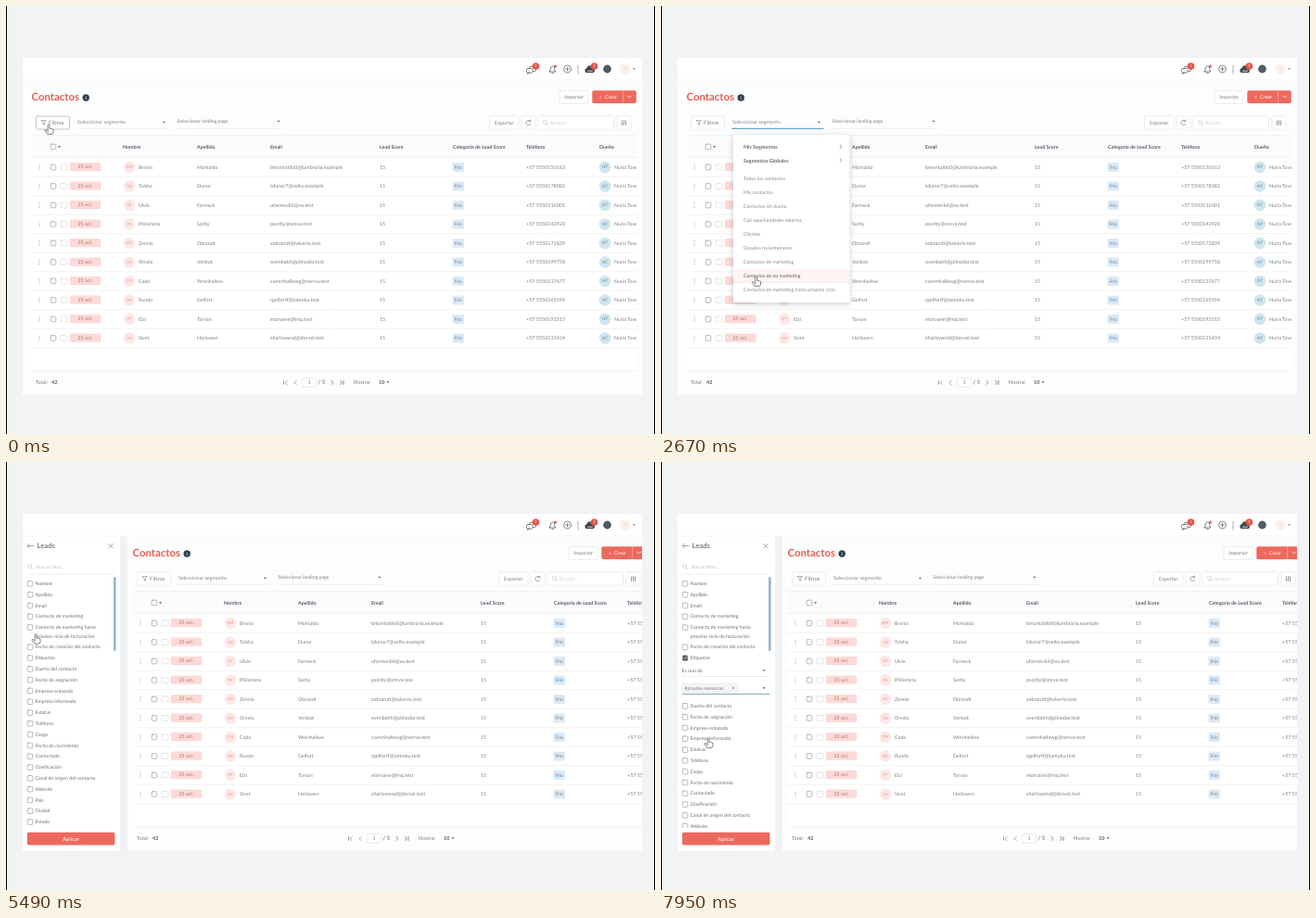
These frames come from a looping animation (700x462 px, 8000 ms). An HTML page with a canvas:

```html
<!DOCTYPE html>
<html lang="es">
<head>
<meta charset="utf-8">
<title>Contactos</title>
<style>
html, body { margin: 0; width: 100%; height: 100%; overflow: hidden; background: #f1f3f5; }
canvas { display: block; width: 700px; height: 462px; }
</style>
</head>
<body>
<canvas id="stage"></canvas>
<script>
const LOOP = 8000;
const RED = '#ee695d', TEXT = '#7a7e84', DARK = '#565b62', PALE = '#bcc0c6', EDGE = '#e2e5e8', BLUE = '#6fa5c6';

const canvas = document.getElementById('stage');
const ratio = window.devicePixelRatio || 1;
canvas.width = 700 * ratio;
canvas.height = 462 * ratio;
const ctx = canvas.getContext('2d');
ctx.scale(ratio, ratio);
ctx.textRendering = 'geometricPrecision';
ctx.lineCap = ctx.lineJoin = 'round';

// When each user action takes effect, in ms
const OPEN_MENU = 620, CLOSE_MENU = 3930, OPEN_PANEL = 4100, OPEN_LEADS = 5020,
      CHECK_TAGS = 6440, FOCUS_TAGS = 6880, PICK_TAG = 7260;

const contacts = [
  'Brenia Montaldo bmontaldo0@lumbraria.example',
  'Tolsha Dunor tdunor7@velto.example',
  'Ulvie Farmeck ufarmeck6@xo.test',
  'Philoriana Sorby psorby@oreva.test',
  'Zennie Obrandt zobrandt@talverix.test',
  'Orsela Venbak ovenbakh@plinodar.test',
  'Cado Wrenhallow cwrenhallowg@noriva.test',
  'Rundo Gelfort rgelfortf@tamoku.test',
  'Elzi Torvan etorvane@lmq.test',
  'Sivet Harlowen sharlowend@dorvel.test'
].map(row => row.split(' '));

const columns = [['Nombre', 126], ['Apellido', 206], ['Email', 285], ['Lead Score', 403],
  ['Categoría de Lead Score', 482], ['Teléfono', 561], ['Dueño', 640]];
const segments = ['Mis Segmentos', 'Segmentos Globales', 'Todos los contactos', 'Mis contactos',
  'Contactos sin dueño', 'Con oportunidades abiertas', 'Clientes', 'Creados recientemente',
  'Contactos de marketing', 'Contactos de no marketing', 'Contactos de marketing hasta próximo ciclo'];
const groups = ['Leads', 'Acciones', 'Email marketing', 'Lead score', 'Lead tracking', 'Automatizaciones'];
const fields = ['Nombre', 'Apellido', 'Email', 'Contacto de marketing',
  'Contacto de marketing hasta|próximo ciclo de facturación', 'Fecha de creación del contacto', 'Etiquetas',
  'Dueño del contacto', 'Fecha de asignación', 'Empresa enlazada', 'Empresa informada', 'Estatus',
  'Teléfono', 'Cargo', 'Fecha de nacimiento', 'Contactado', 'Clasificación',
  'Canal de origen del contacto', 'Website', 'País', 'Ciudad', 'Estado'];

// Pointer path: time, x, y of the tip
const pointer = [[0, 46, 128], [150, 46, 128], [540, 118, 126], [760, 118, 127], [1050, 104, 156.5],
  [1300, 104, 160], [1860, 98, 281], [2200, 99, 303], [2600, 103, 300], [3120, 95, 142],
  [3630, 93, 134], [3700, 92, 133], [3980, 48, 127], [4160, 48, 127], [4500, 45, 137],
  [4600, 45, 138], [4900, 32, 185], [5750, 32, 186], [6350, 31, 213.5], [6600, 31, 213.5],
  [6850, 56, 244], [6950, 56, 244], [7200, 52, 262], [7400, 52, 263], [7900, 51, 298], [8000, 51, 298]];
const HAND = new Path2D('M-1 1Q-1 0 0 0Q1 0 1 1V4.4L1.6 4Q2.6 3.9 2.7 4.8Q3.6 4.3 4 5.2Q5 5 5 6V8Q4.8 9.3 4 10.3H-1.5L-4 6.6Q-4.3 5.4-3 5.6L-1 7.3Z');
const ARROW = new Path2D('M0 0V6.6L1.6 5.2L2.7 7.7L3.8 7.2L2.7 4.8H4.8Z');

const clamp = v => Math.max(0, Math.min(1, v));
const smooth = v => v * v * (3 - 2 * v);
const ramp = (t, start, length) => smooth(clamp((t - start) / length));
const within = (t, a, b) => t >= a && t < b;

function text(str, x, y, size = 5.4, color = TEXT, weight = 400, align = 'left') {
  ctx.font = `${weight} ${size}px Lato, "Open Sans", sans-serif`;
  ctx.fillStyle = color;
  ctx.textAlign = align;
  ctx.fillText(str, x, y + size * .32);
}
function paint(fill, stroke, width = .7) {
  if (fill) { ctx.fillStyle = fill; ctx.fill(); }
  if (stroke) { ctx.strokeStyle = stroke; ctx.lineWidth = width; ctx.stroke(); }
}
function box(x, y, w, h, fill, stroke, radius = 0) {
  ctx.beginPath();
  ctx.roundRect(x, y, w, h, radius);
  paint(fill, stroke);
}
function disc(x, y, r, fill, stroke, width) {
  ctx.beginPath();
  ctx.arc(x, y, r, 0, 7);
  paint(fill, stroke, width);
}
function line(color, width, ...points) {
  ctx.beginPath();
  for (let i = 0; i < points.length; i += 2) ctx.lineTo(points[i], points[i + 1]);
  paint(null, color, width);
}
function caret(x, y, color = DARK) {
  ctx.beginPath();
  ctx.moveTo(x - 1.6, y - .8);
  ctx.lineTo(x + 1.6, y - .8);
  ctx.lineTo(x, y + 1);
  ctx.closePath();
  paint(color);
}
const chevron = (x, y, dir = 1, color = TEXT) =>
  line(color, .7, x - dir, y - 2, x + dir, y, x - dir, y + 2);
const checkbox = (x, y, s = 5.6, fill = '#fff') => box(x - s / 2, y - s / 2, s, s, fill, '#989da3', 1);
function lens(x, y) {
  disc(x - .5, y - .5, 2.1, null, PALE, .6);
  line(PALE, .6, x + 1.1, y + 1.1, x + 2.6, y + 2.6);
}
function button(label, x, y, w, h = 14) {
  box(x, y, w, h, '#fff', EDGE, 1.5);
  text(label, x + w / 2, y + h / 2, 5.4, TEXT, 400, 'center');
}
function clipped(x, y, w, h, draw) {
  ctx.save();
  ctx.beginPath();
  ctx.rect(x, y, w, h);
  ctx.clip();
  draw();
  ctx.restore();
}
function shifted(dx, draw) {
  ctx.save();
  ctx.translate(dx, 0);
  draw();
  ctx.restore();
}
function badge(x, y) {
  disc(x, y, 3.8, '#e4574c');
  text('1', x, y, 4, '#fff', 400, 'center');
}

function drawTopBar() {
  box(18, 56, 668, 24, '#fff');
  line('#eceef1', .7, 18, 80, 686, 80);
  box(564.5, 65.5, 7, 5, '#fff', DARK, 1.2);
  box(561.5, 67.5, 6.5, 4.5, '#fff', DARK, 1.2);
  line(DARK, .8, 563, 72, 562.6, 73.3, 564.6, 72);
  badge(571.5, 65);
  line(DARK, .8, 586, 71, 587.2, 69, 587.2, 66.5, 589.5, 64.8, 591.7, 66.5, 591.7, 69, 593, 71, 586, 71);
  line(DARK, .8, 588.7, 72.4, 590.3, 72.4);
  disc(592.5, 65, 1.5, '#e4574c');
  disc(605.5, 68, 4, null, DARK, .7);
  line(DARK, .7, 603.5, 68, 607.5, 68);
  line(DARK, .7, 605.5, 66, 605.5, 70);
  line('#858a90', .7, 617, 64, 617, 73);
  disc(627, 69.5, 2.6, '#43484f');
  disc(630, 67.8, 3.5, '#43484f');
  box(626, 68, 9, 4.1, '#43484f', null, 2);
  line('#e6e8ea', .9, 627.5, 70.2, 632.5, 70.2);
  badge(634.5, 65);
  disc(648.5, 68, 4.4, '#54595f');
  disc(668, 68, 6, '#fdf0ee');
  text('K', 668, 68, 4.5, '#f2c3bd', 400, 'center');
  caret(677.5, 68, '#888');
}

function drawRow([first, last, email], index) {
  const y = 174 + index * 20.5;
  for (const d of [-2.2, 0, 2.2]) disc(36, y + d, .55, '#8e9298');
  checkbox(51, y);
  box(59, y - 3, 7, 6, '#fff', '#d8dbdf', 1);
  box(68.7, y - 5, 33.6, 9.2, '#fcdad7', null, 1.5);
  text('25 oct.', 85.5, y - .4, 5.2, '#b0716c', 400, 'center');
  disc(133, y, 6.3, '#fde8e6');
  text(first[0] + last[0], 133, y, 4.2, '#ea8f87', 400, 'center');
  text(first, 143, y, 5.3);
  text(last, 206, y, 5.3);
  text(email, 285, y, 5.5);
  text('15', 403, y, 5.3);
  box(481.5, y - 5, 12.5, 10, '#dbeaf6', null, 1.5);
  text('Frío', 487.7, y, 5.1, '#6c8396', 400, 'center');
  text('+57 55501' + (10000 + (40163 + index * 27919) % 90000), 561, y, 5.4);
  disc(646, y, 6.3, '#cfe6ef');
  text('NT', 646, y, 4.6, '#64838f', 400, 'center');
  text('Nuria Tovel', 656, y, 5.3);
  line('#f0eeeb', .7, 28, y + 10.2, 700, y + 10.2);
}

function drawTable(open) {
  clipped(28 + 109 * open, 139, 652 - 99 * open, 256, () => shifted(109 * open, () => {
    box(28, 139, 700, 24.5, '#fafbfc');
    box(28, 163.5, 700, 230, '#fff');
    line('#eaecef', .7, 28, 139.4, 700, 139.4);
    line('#ebebea', .7, 28, 163.5, 700, 163.5);
    line('#f0eeeb', .7, 28, 393.5, 700, 393.5);
    checkbox(51, 152);
    caret(57.5, 152);
    for (const [label, x] of columns) text(label, x, 152, 5.3, DARK, 700);
    contacts.forEach(drawRow);
  }));
}

function drawFooter(open) {
  shifted(109 * open, () => {
    text('Total:', 32, 406.5, 5.5);
    text('42', 49, 406.5, 5.5, DARK, 700);
  });
  shifted(70 * open, () => {
    line(TEXT, .7, 299.5, 404.5, 299.5, 408.5);
    chevron(302, 406.5, -1);
    chevron(312, 406.5, -1);
    box(319.5, 401.5, 15, 10, '#fff', EDGE, 1);
    text('1', 327, 406.5, 5.5, TEXT, 400, 'center');
    text('/ 5', 336.5, 406.5, 6, DARK);
    chevron(352, 406.5, 1, DARK);
    chevron(361.5, 406.5, 1, DARK);
    line(DARK, .7, 364, 404.5, 364, 408.5);
    text('Mostrar', 374.5, 406.5, 5.4);
    text('10', 402, 406.5, 5.5, DARK, 700);
    caret(412, 406, DARK);
  });
}

function drawToolbar(t, open) {
  const focused = within(t, OPEN_PANEL, OPEN_LEADS);
  const hovered = t < 240 || within(t, 3900, OPEN_PANEL);
  const menuOpen = within(t, OPEN_MENU, CLOSE_MENU);
  shifted(109 * open, () => {
    text('Contactos', 27.5, 98.5, 11.4, '#e65d52', 700);
    disc(86.2, 99, 3.7, '#2c3e50');
    text('i', 86.2, 99, 5, '#fff', 700, 'center');
    box(32.5, 119, 36, 14, focused ? '#c8e0ea' : '#fff', focused ? '#91b9c9' : hovered ? '#a8adb4' : EDGE, 1.5);
    line(TEXT, .6, 38.3, 123.5, 43.3, 123.5, 41.4, 126, 41.4, 128.5, 40.2, 127.8, 40.2, 126, 38.3, 123.5);
    text('Filtros', 46, 126, 6, TEXT);
    text('Seleccionar segmento', 77, 125.5, 5.45, '#858a90');
    caret(170.5, 125.5);
    line(menuOpen ? BLUE : '#e8eaed', menuOpen ? 1.3 : .7, 77, 132.3, 175, 132.3);
    text('Seleccionar landing page', 184.5, 124.7, 5.1, '#7c8187');
    caret(294, 124.5);
    line('#e8eaed', .7, 183, 132.3, 299, 132.3);
  });
  shifted(10 * open, () => {
    button('Importar', 597, 91.5, 31);
    box(632.3, 91.3, 47.5, 13.7, RED, null, 1.8);
    text('+  Crear', 649.5, 98, 5.4, '#fff', 400, 'center');
    line('#f8b5ae', .7, 665.6, 92, 665.6, 104.3);
    line('#fff', .8, 670.6, 97, 672.6, 99, 674.6, 97);
    button('Exportar', 521.5, 119, 31.5);
    button('', 556, 119, 15);
    ctx.beginPath();
    ctx.arc(563.5, 126, 2.5, .4, 5.5);
    paint(null, TEXT);
    line(TEXT, .7, 565.8, 122.8, 565.6, 124.7, 563.8, 124.7);
    button('', 574, 119, 81.5);
    lens(582, 126);
    text('Buscar...', 587, 126, 5.4, '#cdd1d5');
    button('', 659, 119, 15);
    [[-2, 1], [0, -1], [2, 1]].forEach(([x, y]) => {
      line(TEXT, .7, 666.5 + x, 123.5, 666.5 + x, 128.5);
      line(TEXT, .7, 666 + x, 126 + y, 667 + x, 126 + y);
    });
  });
}

function drawMenu(t, tipX, tipY) {
  const shown = ramp(t, OPEN_MENU, 120) * (1 - ramp(t, CLOSE_MENU, 80));
  if (!shown) return;
  ctx.save();
  ctx.globalAlpha = shown;
  ctx.shadowColor = 'rgba(60,70,80,.28)';
  ctx.shadowBlur = 6 * ratio;
  ctx.shadowOffsetY = 1.5 * ratio;
  box(78, 139, 125.5, 181, '#fff', null, 1.5);
  ctx.shadowColor = 'transparent';
  segments.forEach((label, i) => {
    const main = i < 2, y = main ? 152.5 + i * 14.3 : 186 + (i - 2) * 15.05;
    const hover = Math.abs(tipY - 2.5 - y) < 7.4 && tipX < 203;
    if (hover) {
      box(78, y - 7.2, 125.5, 14.4, '#fef4f2');
      line('#f9e1dc', .6, 78, y + 7.2, 203.5, y + 7.2);
    }
    text(label, 89, y, main ? 5.4 : 5.2, hover ? '#5c5c60' : main ? '#62666c' : '#85898f', main ? 700 : 400);
    if (main) chevron(194, y - .5, 1, hover ? RED : TEXT);
  });
  ctx.restore();
}

function drawGroups() {
  text('Filtros', 22.5, 90.5, 7.6, DARK);
  text('Segmentos', 22.5, 106.3, 5.3, DARK, 700);
  box(23, 117, 94, 14.5, '#fff', EDGE, 1.5);
  text('Seleccionar segmento', 32, 124.5, 5.35, '#9da2a8');
  caret(110, 124.5);
  lens(26, 153);
  text('Buscar filtro...', 33, 153, 5, PALE);
  line(EDGE, .7, 23, 160, 117, 160);
  text('Todos los filtros', 22.5, 173, 5.5, DARK, 700);
  groups.forEach((label, i) => {
    const y = 186.5 + i * 17.4;
    text(label, 22.5, y, 5.35, '#6c7076');
    chevron(116, y, 1);
  });
}

function drawLeads(t) {
  const checked = t >= CHECK_TAGS, picked = t >= PICK_TAG, focused = t >= FOCUS_TAGS;
  line(TEXT, .7, 30, 90.5, 23, 90.5, 25.3, 88.2);
  line(TEXT, .7, 23, 90.5, 25.3, 92.8);
  text('Leads', 33.5, 90.5, 7.8, DARK);
  lens(26, 113);
  text('Buscar filtro...', 33, 113, 5, PALE);
  line(EDGE, .7, 23, 121, 117, 121);
  clipped(18, 123, 105, 272, () => {
    let y = 131.4;
    for (const label of fields) {
      const on = checked && label === 'Etiquetas';
      checkbox(26, y, 5.6, on ? '#4b5158' : '#fff');
      if (on) line('#fff', .7, 24.7, y, 25.7, y + 1.1, 27.4, y - 1.2);
      label.split('|').forEach((part, i) => {
        y += i * 9.4;
        text(part, 31.5, y, 5.2, '#6c7076');
      });
      if (on) {
        text('Es uno de', 22.5, 225.5, 5.2, '#6c7076');
        caret(111, 225);
        line('#e8eaed', .7, 23, 231.5, 117, 231.5);
        if (picked) {
          box(23, 239, 60, 10, '#f2f4f6', '#e6e9ec', 1.5);
          text('#prueba-asesorias', 25.5, 244.3, 5.2, '#777b81');
          text('×', 78, 244, 6, TEXT, 400, 'center');
        } else text('Buscar Etiqueta', 23.5, 245.5, 5.2, '#a0a5ab');
        caret(111, 244);
        line(focused ? '#84b0b4' : '#a3bbc4', focused ? 1.1 : .9, 23, 250.5, 117, 250.5);
        y += 40;
      }
      y += 11.8;
    }
  });
  box(116, 124, 2.6, 80, '#92b5cb', null, 1.3);
  box(22.8, 399.8, 94.6, 13.8, RED, null, 1.8);
  text('Aplicar', 70, 406.8, 5.8, '#fff', 400, 'center');
}

function drawPanel(t, open) {
  if (!open) return;
  shifted(-113 * (1 - open), () => {
    box(18, 80.4, 113, 339.6, '#f0f3f5');
    box(18, 80.4, 105, 339.6, '#fff');
    line(TEXT, .7, 110.8, 88.4, 115.2, 92.8);
    line(TEXT, .7, 115.2, 88.4, 110.8, 92.8);
    t < OPEN_LEADS ? drawGroups() : drawLeads(t);
  });
}

function pointerAt(t) {
  const i = pointer.findIndex(key => key[0] > t);
  const [t0, x0, y0] = pointer[i - 1], [t1, x1, y1] = pointer[i];
  const k = smooth((t - t0) / (t1 - t0));
  return [x0 + (x1 - x0) * k, y0 + (y1 - y0) * k];
}

function drawPointer(t, x, y) {
  const shape = within(t, 3150, 3880) || within(t, 4250, 4800) ? ARROW : HAND;
  ctx.save();
  ctx.translate(x, y);
  ctx.fillStyle = '#fff';
  ctx.strokeStyle = '#4a4d52';
  ctx.lineWidth = .7;
  ctx.fill(shape);
  ctx.stroke(shape);
  ctx.restore();
}

function render(t) {
  const open = ramp(t, OPEN_PANEL, 300);
  const [x, y] = pointerAt(t);
  box(0, 0, 700, 462, '#f1f3f5');
  clipped(18, 56, 668, 364, () => {
    box(18, 56, 668, 364, '#fcfdfe');
    drawTopBar();
    drawToolbar(t, open);
    drawTable(open);
    drawFooter(open);
    drawPanel(t, open);
  });
  drawMenu(t, x, y);
  drawPointer(t, x, y);
  box(0, 0, 1, 462, '#000');
  box(699, 0, 1, 462, '#000');
}

const start = performance.now();
function tick() {
  render((performance.now() - start) % LOOP);
  requestAnimationFrame(tick);
}
tick();
</script>
</body>
</html>
```
